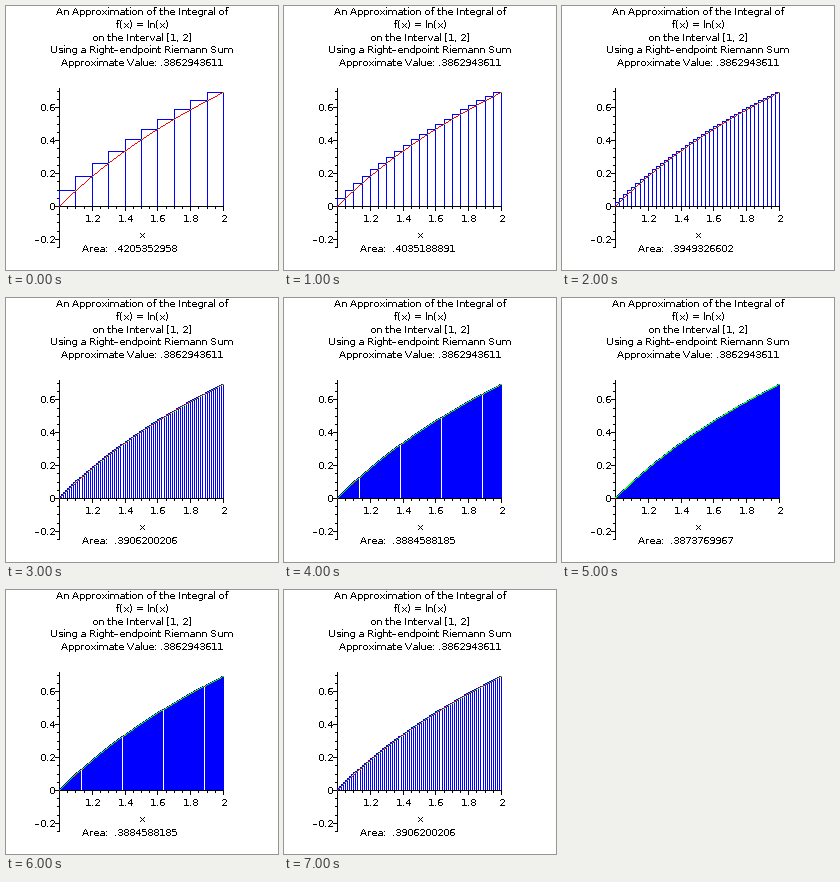
A matplotlib script for the animation above (8000 ms loop, 272 by 264 pixels).

```python
import numpy as np
import matplotlib.pyplot as plt
from matplotlib.animation import FuncAnimation

plt.rcParams.update({
    "font.family": "DejaVu Sans", "font.size": 7.2,
    "text.hinting": "native", "text.hinting_factor": 1,
    "text.kerning_factor": 6, "text.antialiased": False,
})

W, H = 272, 264
X0, Y0 = 52.96, 200         # pixel of the point (1, 0)
SX, SY = 164, 164.5         # pixels per unit
COUNTS = [10, 20, 40, 80, 160, 320, 160, 80]
BLACK, BLUE, RED, GREEN = (0, 0, 0), (0, 0, 255), (255, 0, 0), (0, 255, 0)


def col(x):
    return np.floor(X0 + (np.asarray(x) - 1) * SX + 0.5).astype(int)


def row(y):
    return np.floor(Y0 - np.asarray(y) * SY + 0.5).astype(int)


def hline(img, x1, x2, y, color):
    img[y, x1:x2 + 1] = color


def vline(img, x, y1, y2, color):
    img[y1:y2 + 1, x] = color


def axes_image():
    img = np.full((H, W, 3), 255, np.uint8)
    left, right, base = col(1), col(2), row(0)
    vline(img, left, 82, 241, BLACK)
    hline(img, left, right, base, BLACK)
    for k in range(1, 21):
        vline(img, col(1 + k * 0.05), base, base + (2 if k % 4 else 4), BLACK)
    for k in range(-5, 15):
        hline(img, left - (2 if k % 4 else 4), left, row(k * 0.05), BLACK)
    return img


def draw_sum(img, n):
    """Boxes, then the curve, then the sample points."""
    edges = 1 + np.arange(n + 1) / n
    cols, tops, base = col(edges), row(np.log(edges)), row(0) - 1
    for a, b, top in zip(cols, cols[1:], tops[1:]):
        vline(img, a, top, base, BLUE)
        vline(img, b, top, base, BLUE)
        hline(img, a, b, top, BLUE)

    knots = np.linspace(1, 2, 50)
    xs = np.arange(cols[0], cols[-1] + 1)
    ys = row(np.interp(1 + (xs - X0) / SX, knots, np.log(knots)))
    img[ys, xs] = RED
    img[tops[1:], cols[1:]] = GREEN
    return np.log(edges[1:]).sum() / n


fig = plt.figure(figsize=(W / 100, H / 100), dpi=100, facecolor="white")
ax = fig.add_axes([0, 0, 1, 1])
ax.axis("off")
background = axes_image()
picture = ax.imshow(background, extent=(0, W, H, 0), aspect="auto",
                    interpolation="nearest")


def label(x, y, s, ha="center"):
    return ax.text(x, y, s, ha=ha, va="baseline", color="black")


TITLE = ["An Approximation of the Integral of", "f(x) = ln(x)",
         "on the Interval [1, 2]", "Using a Right\u2013endpoint Riemann Sum",
         "Approximate Value: .3862943611"]
for k, line in enumerate(TITLE):
    label(136, 9 + 12.8 * k, line)

for v in (1.2, 1.4, 1.6, 1.8, 2):
    label(col(v) + 0.5, 216, f"{v:g}")
for v in (-0.2, 0, 0.2, 0.4, 0.6):
    label(49, row(v) + 4, f"{v:g}".replace("-", "\u2013"), ha="right")
label(136, 232, "x")
area = label(76, 246, "", ha="left")


def draw(i):
    img = background.copy()
    total = draw_sum(img, COUNTS[i])
    picture.set_data(img)
    area.set_text("Area:  " + f"{total:.10f}".lstrip("0"))
    return picture, area


anim = FuncAnimation(fig, draw, frames=len(COUNTS), interval=1000, repeat=True)
plt.show()
```
